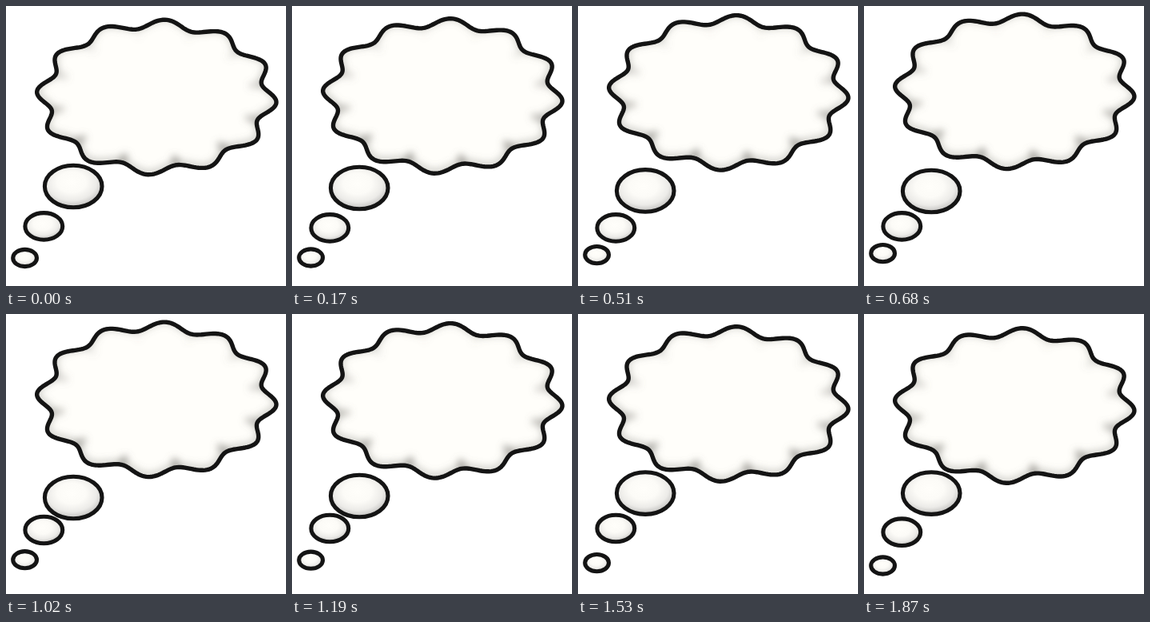
Animation, 350 px wide and 350 px high, one loop 2.04 s. Source, as an HTML page:

```html
<!DOCTYPE html>
<html lang="en">
<head>
<meta charset="utf-8">
<title>Thought bubble</title>
<style>
html, body { margin: 0; width: 100%; height: 100%; overflow: hidden; background: #fff; }
svg { display: block; width: 100%; height: 100%; }
.line { fill: none; stroke: #141414; stroke-width: 5.4; stroke-linejoin: round; }
.puff { fill: url(#pearl); stroke: #141414; stroke-width: 5.1; }
.shade { fill: none; stroke: #77756f; stroke-linecap: round; }
</style>
</head>
<body>
<svg viewBox="0 0 350 350">
  <defs>
    <radialGradient id="pearl" cx=".47" cy=".4" r=".62">
      <stop offset="0" stop-color="#fffefa"/>
      <stop offset=".4" stop-color="#fcfbf7"/>
      <stop offset=".7" stop-color="#ecebe8"/>
      <stop offset="1" stop-color="#bab9b7"/>
    </radialGradient>
    <filter id="soft" filterUnits="userSpaceOnUse" x="0" y="-20" width="350" height="260">
      <feGaussianBlur stdDeviation="5"/>
    </filter>
    <path id="edge"/>
    <clipPath id="inside"><use href="#edge"/></clipPath>
  </defs>
  <g id="cloud">
    <use href="#edge" fill="#fffefa"/>
    <g clip-path="url(#inside)">
      <g id="shades" class="shade" filter="url(#soft)">
        <use href="#edge" y="-2" stroke-width="8" stroke-opacity=".35"/>
      </g>
    </g>
    <use href="#edge" class="line"/>
  </g>
  <ellipse id="big" class="puff" cx="84.2" cy="227.5" rx="35.8" ry="26.3"/>
  <ellipse id="mid" class="puff" cx="47.3" cy="272.7" rx="23.4" ry="16.8"/>
  <ellipse id="small" class="puff" cx="23.6" cy="311.1" rx="14.9" ry="10.6"/>
</svg>
<script>
const STEP = 170, STEPS = 12, LOBES = 12, TILT = 4.2, SAMPLES = 360;
const $ = id => document.getElementById(id);
const rad = deg => deg * Math.PI / 180;

// Point on the cloud's ellipse, scaled by r
function spot(deg, r) {
  const x = 188.3 + 150 * r * Math.cos(rad(deg));
  const y = 110.4 + 97 * r * Math.sin(rad(deg));
  return x.toFixed(2) + " " + y.toFixed(2);
}

// Scalloped rim: an ellipse with a cosine ripple
const ripple = deg => 0.945 + 0.055 * Math.cos(rad(LOBES * (deg - TILT)));
const rim = Array.from({ length: SAMPLES }, (_, i) => spot(i, ripple(i)));
$("edge").setAttribute("d", "M" + rim.join("L") + "Z");

// Soft creases run inward from the valleys, fading towards the top
for (let i = 0; i < LOBES; i++) {
  const deg = TILT + (i + 0.5) * 360 / LOBES;
  const crease = document.createElementNS("http://www.w3.org/2000/svg", "path");
  crease.setAttribute("d", `M${spot(deg, 0.89)}L${spot(deg, 0.81)}`);
  crease.setAttribute("stroke-width", 8);
  crease.setAttribute("stroke-opacity", Math.max(0, 0.35 + 0.3 * Math.sin(rad(deg))));
  $("shades").append(crease);
}

// Each part bobs on the same wave, reaching its lowest point at its own step
const parts = [
  { el: $("cloud"), amp: 4.1, low: 11 },
  { el: $("big"), amp: 4, low: 4 },
  { el: $("mid"), amp: 5.4, low: 2 },
  { el: $("small"), amp: 3.9, low: 0 }
];

function draw(time) {
  const step = Math.floor(time / STEP) % STEPS;
  for (const { el, amp, low } of parts) {
    const y = amp * Math.cos((step - low) / STEPS * 2 * Math.PI);
    el.setAttribute("transform", `translate(0 ${y.toFixed(3)})`);
  }
}

const start = performance.now();
function tick() {
  draw(performance.now() - start);
  requestAnimationFrame(tick);
}
tick();
</script>
</body>
</html>
```
